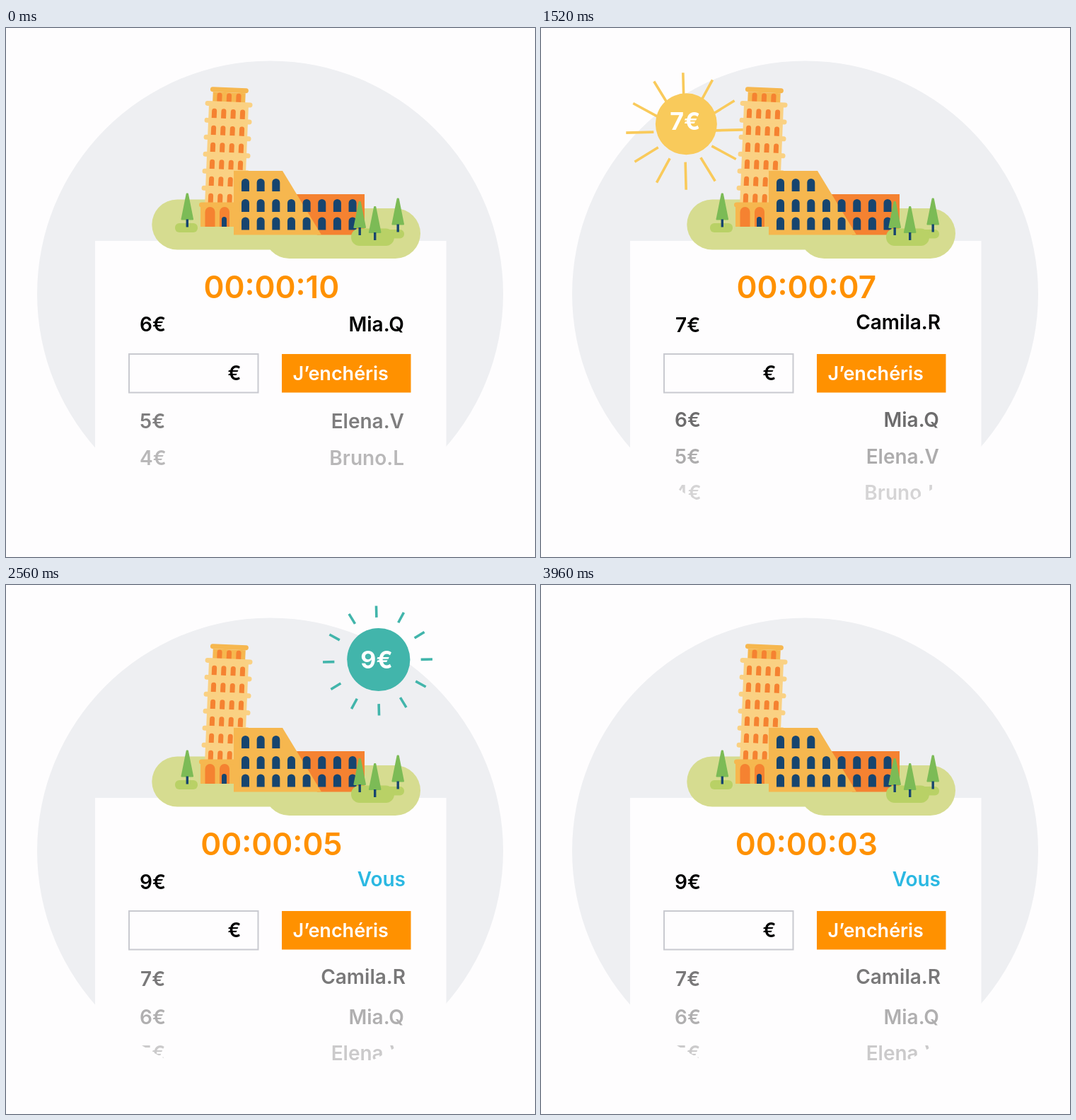
Animation of 748 by 748 pixels, one loop 4000 ms. Source, as an HTML page:

```html
<!DOCTYPE html>
<html lang="fr">
<head>
<meta charset="utf-8">
<title>Enchère</title>
<style>
html, body { margin: 0; width: 100%; height: 100%; overflow: hidden; background: #fefdfe; }
svg { display: block; width: 100vw; height: 100vh; }
text { font-family: Inter, "Open Sans", sans-serif; font-weight: 600; font-size: 28px; }
.clock { font-size: 44px; fill: #ff9100; text-anchor: middle; }
.price { font-size: 34px; font-weight: 700; fill: #fff; text-anchor: middle; }
.label { font-size: 27px; fill: #fff; }
.end { text-anchor: end; }
</style>
</head>
<body>
<svg id="stage" viewBox="0 0 748 748"></svg>
<script>
const LOOP = 4000;
const NS = 'http://www.w3.org/2000/svg';
const stage = document.getElementById('stage');
const C = {
  sand: '#fad183', gold: '#f6b74f', orange: '#f58231', navy: '#17456f',
  grass: '#d6dc90', bush: '#b9d166', leaf: '#7cbb56'
};

function add(parent, tag, attrs, label) {
  const el = document.createElementNS(NS, tag);
  set(el, attrs);
  if (label) el.textContent = label;
  parent.appendChild(el);
  return el;
}
function set(el, attrs) {
  for (const k in attrs) el.setAttribute(k, attrs[k]);
}
const group = (parent, attrs = {}) => add(parent, 'g', attrs);
const box = (parent, x, y, width, height, fill, rx = 0) =>
  add(parent, 'rect', { x, y, width, height, rx, fill });
const poly = (parent, points, fill) => add(parent, 'polygon', { points, fill });

// Arched opening centred on x, standing on the line y + h
function arch(parent, x, y, w, h, fill) {
  const r = w / 2;
  add(parent, 'path', { fill, d: `M${x - r} ${y + h}V${y + r}a${r} ${r} 0 0 1 ${w} 0V${y + h}z` });
}

function tree(parent, x, top) {
  const base = top + 38;
  add(parent, 'path', {
    fill: C.leaf, stroke: C.leaf, 'stroke-width': 2, 'stroke-linejoin': 'round',
    d: `M${x - 0.6} ${top + 1}h1.2L${x + 7.8} ${base - 1}h-15.6z`
  });
  box(parent, x - 1.7, base - 1, 3.4, 11, C.navy);
}

function tower(parent) {
  const g = group(parent, { transform: 'translate(307.8 281) rotate(2.4)' });
  box(g, -23, -190, 46, 20, C.gold);
  box(g, -28, -173, 56, 145, C.sand);
  for (const x of [-13.5, 0, 13.5]) arch(g, x, -189, 7, 13, C.orange);
  box(g, -27, -197, 54, 7, C.gold, 3.5);
  for (let i = 0; i < 6; i++) {
    const y = -177 + i * 24;
    box(g, -33.5, y, 67, 7, C.sand, 3.5);
    for (const x of [-20, -6.7, 6.7, 20]) arch(g, x, y + 10.5, 7, 13.5, C.orange);
  }
  box(parent, 275, 249, 64, 32, C.gold);
  box(parent, 273, 246.5, 67, 7, C.gold, 3.5);
  arch(parent, 288.5, 253, 14, 28, C.orange);
  arch(parent, 309, 253, 14, 28, C.orange);
  arch(parent, 308.5, 267, 7, 14, C.navy);
}

function arena(parent) {
  poly(parent, '405,235 507,235 507,292.5 440,292.5', C.orange);
  poly(parent, '322,202 391,202 446,292.5 322,292.5', C.gold);
  [[213, 3], [242, 8], [267.5, 8]].forEach(([y, n]) => {
    for (let i = 0; i < n; i++) arch(parent, 338.5 + i * 21.65, y, 11, 18, C.navy);
  });
}

function scenery() {
  const g = group(stage);
  box(g, 206.3, 242.5, 238, 71, C.grass, 35.5);
  box(g, 365, 255, 221, 71, C.grass, 35.5);
  tower(g);
  arena(g);
  box(g, 239, 276, 32, 13, C.bush, 6);
  box(g, 534, 285, 29, 12.5, C.bush, 6);
  box(g, 488, 283.5, 61, 24.5, C.bush, 12);
  tree(g, 256.3, 233.5);
  tree(g, 500.2, 245);
  tree(g, 521.7, 252);
  tree(g, 554.2, 240.5);
}

// Bid rows: [price, name, left edge, right edge, heights by step, name lift, opacities by step, time shown]
const BIDS = [
  ['4€', 'Bruno.L', 189, 563, [608, 657.5, 714], 0, [0.27, 0.16, 0.1], 0],
  ['5€', 'Elena.V', 189, 563, [556, 606.5, 662], 0, [0.5, 0.31, 0.2], 0],
  ['6€', 'Mia.Q', 189, 563, [419, 555, 610.5], 0, [1, 0.56, 0.3], 0],
  ['7€', 'Camila.R', 190, 565, [419.5, 419.5, 557], 3.5, [1, 1, 0.52], 1320],
  ['9€', 'Vous', 189, 565, [420, 420, 420], 4, [1, 1, 1], 2180]
];
const CAP = 10.2; // half the height of a capital

const disc = { cx: 373.5, cy: 376, r: 329.5 };
add(add(stage, 'clipPath', { id: 'disc' }), 'circle', disc);
add(stage, 'circle', { ...disc, fill: '#eeeff2' });
box(stage, 126, 301, 496.5, 447, '#fefdfe');
scenery();

const list = group(stage, { 'clip-path': 'url(#disc)' });
const rows = BIDS.map(([price, name, left, right, ys, lift, alphas, from]) => {
  const g = group(list);
  add(g, 'text', { x: left, y: CAP }, price);
  add(g, 'text', { x: right, y: CAP - lift, class: 'end', fill: name === 'Vous' ? '#2bb8e2' : '#000' }, name);
  return { g, ys, alphas, from };
});

add(stage, 'rect', { x: 174, y: 461, width: 182.5, height: 54.5, fill: '#fefdfe', stroke: '#c9cad0', 'stroke-width': 2 });
add(stage, 'text', { x: 332.5, y: 498, class: 'end' }, '€');
box(stage, 390, 461, 182.5, 54.5, '#ff9100');
add(stage, 'text', { x: 405.5, y: 498, class: 'label' }, 'J’enchéris');
const clock = add(stage, 'text', { x: 375.3, y: 382, class: 'clock' });

function bubble(color, price) {
  const g = group(stage);
  const rays = add(g, 'path', { stroke: color, 'stroke-width': 3.6, fill: 'none' });
  const ball = add(g, 'circle', { fill: color });
  const tag = add(g, 'text', { class: 'price' }, price);
  return { rays, ball, tag };
}
const yellow = bubble('#f9ca5b', '7€');
const teal = bubble('#42b5ab', '9€');

const clamp = v => Math.min(1, Math.max(0, v));
const span = (t, from, length) => clamp((t - from) / length);
const outQuad = u => 1 - (1 - u) ** 2;
const inOutQuad = u => u < 0.5 ? 2 * u * u : 1 - 2 * (1 - u) ** 2;
const mix = (a, b, u) => a + (b - a) * u;

function track(keys, t) {
  const i = keys.findIndex(k => k[0] > t);
  if (i === 0) return keys[0][1];
  if (i < 0) return keys[keys.length - 1][1];
  const [t0, v0] = keys[i - 1], [t1, v1] = keys[i];
  return mix(v0, v1, (t - t0) / (t1 - t0));
}

function burst(x, y, inner, outer) {
  if (outer - inner < 0.5) return '';
  let d = '';
  for (let i = 0; i < 12; i++) {
    const a = (i * 30 - 1.5) * Math.PI / 180;
    const c = Math.cos(a), s = Math.sin(a);
    d += `M${x + c * inner} ${y + s * inner}L${x + c * outer} ${y + s * outer}`;
  }
  return d;
}

function drawBubble(b, t, o) {
  const r = o.r * outQuad(span(t, o.start, 280));
  set(b.ball, { cx: o.x, cy: o.y, r });
  set(b.tag, { x: o.tx, y: o.ty + 12.3, opacity: span(t, o.start + 160, 120) });
  const outer = mix(o.r, o.reach, outQuad(span(t, o.start + 200, 200)));
  const inner = mix(o.r, o.reach, span(t, o.start + 320, 280));
  set(b.rays, { d: burst(o.rx, o.ry, inner, outer) });
}

// Slow drift upwards, then a quick exit through the top
const RISE_7 = [[1440, 143], [1880, 104], [2200, 73], [2280, 64.5], [2400, 24], [2520, -52]];
const RISE_9 = [[2600, 105.5], [2720, 94], [2880, 55], [3040, 2], [3160, -52]];

function draw(t) {
  const step = inOutQuad(span(t, 1150, 400)) + inOutQuad(span(t, 2110, 400));
  const i = Math.min(1, Math.floor(step));
  for (const { g, ys, alphas, from } of rows) {
    const u = step - i;
    set(g, {
      transform: `translate(0 ${mix(ys[i], ys[i + 1], u)})`,
      opacity: mix(alphas[i], alphas[i + 1], u * u),
      visibility: t >= from ? 'visible' : 'hidden'
    });
  }

  const left = 10 - Math.floor((t + 400) / 560);
  clock.textContent = '00:00:' + String(left).padStart(2, '0');

  const y7 = track(RISE_7, t);
  const drift = span(t, 1880, 320);
  drawBubble(yellow, t, {
    start: 1200, r: 43.5, x: mix(206, 202.6, span(t, 1440, 440)), y: y7,
    tx: 203.7 + drift, ty: y7 - 4 - 4 * drift, rx: 203, ry: 146, reach: 90
  });
  const y9 = track(RISE_9, t);
  drawBubble(teal, t, {
    start: 2100, r: 44.6, x: 526.8, y: y9, tx: 524, ty: y9 + 0.5, rx: 525.5, ry: 107, reach: 77.5
  });
}

const begin = performance.now();
function tick() {
  draw((performance.now() - begin) % LOOP);
  requestAnimationFrame(tick);
}
draw(0);
requestAnimationFrame(tick);
</script>
</body>
</html>
```
